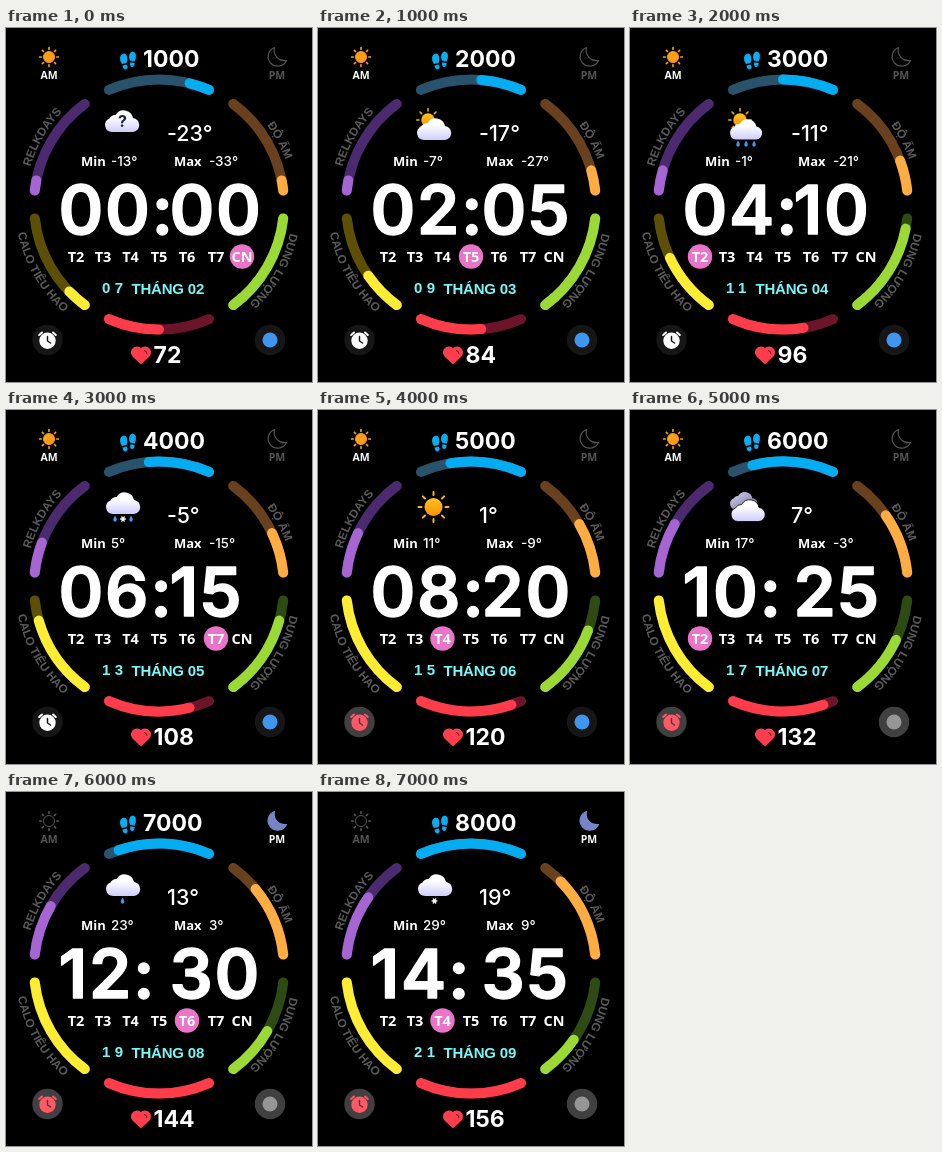
Write an HTML page that moves like this. It is 306 px wide and 354 px high and loops after 8 s.

```html
<!DOCTYPE html>
<html lang="vi">
<head>
<meta charset="utf-8">
<title>Watch face</title>
<style>
  html, body { margin: 0; width: 100%; height: 100%; overflow: hidden; background: #000; }
  svg { display: block; width: 306px; height: 354px; fill: #fff; font-family: Inter, sans-serif; font-feature-settings: "calt" 0; }
  .arc { fill: none; stroke-width: 10; stroke-linecap: round; }
  .label { font: bold 11.8px "Liberation Sans", Arial, sans-serif; fill: #5a5a5a; text-anchor: middle; }
  .time { font-size: 68px; font-weight: 600; letter-spacing: 1.7px; stroke: #fff; stroke-width: 1.4; stroke-linejoin: round; }
  .count { font-size: 23px; font-weight: 700; }
  .temp { font-size: 21.5px; font-weight: 500; }
  .range { font: 600 13px "Noto Sans", sans-serif; }
  .range .value { font: 500 13.5px Inter, sans-serif; }
  .day { font: 600 14.5px "Noto Sans", sans-serif; text-anchor: middle; }
  .date { font: bold 15px "Liberation Sans", Arial, sans-serif; fill: #76f7f8; }
  .half { font: bold 10.5px "Noto Sans", sans-serif; text-anchor: middle; }
  .line { fill: none; stroke-linecap: round; stroke-linejoin: round; }
</style>
</head>
<body>
<svg viewBox="0 0 306 354">
  <defs>
    <linearGradient id="mist" x1="0" y1="0" x2="0" y2="1">
      <stop offset=".3" stop-color="#fff"/><stop offset="1" stop-color="#cfcdfb"/>
    </linearGradient>
    <linearGradient id="dusk" x1="0" y1="0" x2="1" y2="1">
      <stop offset="0" stop-color="#d4d4ee"/><stop offset="1" stop-color="#6f6f9c"/>
    </linearGradient>
    <linearGradient id="gold" x1="0" y1="0" x2="0" y2="1">
      <stop offset="0" stop-color="#ffc226"/><stop offset="1" stop-color="#ff9200"/>
    </linearGradient>
    <path id="cloud" d="M7 23A7 7 0 0 1 4.500 9.500A6.500 6.500 0 0 1 10.500 6A9.500 9.500 0 0 1 28 9A7.050 7.050 0 0 1 28 23Z"/>
    <g id="sun">
      <circle r="9" fill="url(#gold)"/>
      <path class="line rays" stroke="#ffb21c" stroke-width="2"/>
    </g>
    <path id="drop" d="M0-3.500Q2.400 0 1.600 1.600A1.700 1.700 0 0 1-1.600 1.600Q-2 0 0-3.500Z" fill="#399df5"/>
    <path id="flake" class="line" d="M-2.400 0H2.400M-1.200-2.100L1.200 2.100M1.200-2.100L-1.200 2.100" stroke="#fff" stroke-width="1.300"/>
  </defs>
  <rect width="306" height="354" fill="#000"/>
  <g id="arcs"></g>
  <g id="labels"></g>

  <g id="am">
    <circle cx="43" cy="29" r="5.500"/>
    <path id="amRays" class="line" stroke-width="1.700" transform="translate(43 29)"/>
    <text class="half" x="43" y="51">AM</text>
  </g>
  <g id="pm">
    <path d="M268.500 19.500A9.600 9.600 0 1 0 280.500 32.500A10.500 10.500 0 0 1 268.500 19.500Z" stroke-width="1.200" stroke-linejoin="round"/>
    <text class="half" x="271" y="51">PM</text>
  </g>

  <g fill="#08aef2">
    <path d="M115 27Q119 23.500 121 28Q122 32 120.500 35L116 36Q112.500 31 115 27ZM116.500 37.500L121 36.500Q122.500 41 119.500 41.500Q117 41.500 116.500 37.500Z"/>
    <path d="M124 25Q127.500 21.500 129.800 26Q130.500 30 128.700 33.500L124.300 32.800Q122 29 124 25ZM124.300 34.300L128.600 35Q128.500 39.500 125.700 39Q123.500 38.500 124.300 34.300Z"/>
  </g>
  <text id="steps" class="count" x="137" y="39"></text>

  <g id="weather">
    <g>
      <use href="#cloud" x="99" y="81" fill="url(#mist)"/>
      <text x="116.500" y="99" text-anchor="middle" font-size="16" font-weight="700" fill="#20243a">?</text>
    </g>
    <g>
      <use href="#sun" transform="translate(110 92) scale(.75)"/>
      <use href="#cloud" x="99" y="89" fill="url(#mist)"/>
    </g>
    <g>
      <use href="#sun" transform="translate(110 92) scale(.75)"/>
      <use href="#cloud" transform="translate(100 90) scale(.94)" fill="url(#mist)"/>
      <use href="#drop" x="108" y="116"/><use href="#drop" x="116" y="116"/><use href="#drop" x="124" y="116"/>
    </g>
    <g>
      <use href="#cloud" x="100" y="81" fill="url(#mist)"/>
      <use href="#drop" x="109" y="109"/><use href="#flake" x="117" y="109"/><use href="#drop" x="125" y="109"/>
    </g>
    <g><use href="#sun" x="115.500" y="97"/></g>
    <g>
      <use href="#cloud" transform="translate(100 81) scale(.8)" fill="url(#dusk)"/>
      <use href="#cloud" x="101" y="88.500" fill="url(#mist)" stroke="#000" stroke-width=".8"/>
    </g>
    <g>
      <use href="#cloud" x="100" y="81" fill="url(#mist)"/>
      <use href="#drop" x="116.500" y="109"/>
    </g>
    <g>
      <use href="#cloud" x="100" y="81" fill="url(#mist)"/>
      <use href="#flake" x="116.500" y="109"/>
    </g>
  </g>

  <text id="temp" class="temp" x="161" y="112.500"></text>
  <g class="range">
    <text x="75" y="138">Min</text><text id="min" class="value" x="105" y="138"></text>
    <text x="168" y="138">Max</text><text id="max" class="value" x="203" y="138"></text>
  </g>

  <text id="hours" class="time" x="52.500" y="206"></text>
  <text id="minutes" class="time" x="163.500" y="206"></text>

  <circle id="today" cy="228.500" r="12.200" fill="#ea74ca"/>
  <g id="days"></g>

  <g class="date">
    <text id="date" x="96" y="265" letter-spacing="4.500"></text>
    <text id="month" x="125.500" y="266" letter-spacing="-.2"></text>
  </g>

  <g transform="translate(41.500 312)">
    <circle id="alarmBack" r="15.200"/>
    <g id="alarm">
      <circle cy=".7" r="8.200"/>
      <path class="line" d="M-8.300-5L-5.500-7.500M8.300-5L5.500-7.500" stroke="currentColor" stroke-width="2"/>
      <path id="hands" class="line" d="M0-3.500V1L3 3" stroke-width="1.500"/>
    </g>
  </g>
  <g transform="translate(264 312)">
    <circle id="linkBack" r="15.200"/>
    <circle id="link" r="7.500"/>
  </g>

  <path d="M135 335.500L127 328A5.300 5.300 0 0 1 135 321A5.300 5.300 0 0 1 143 328Z" fill="#ff3d4c" stroke="#ff3d4c" stroke-width="1.500" stroke-linejoin="round"/>
  <path class="line" d="M138.500 322.500Q141 323 141 325.500" stroke="#5c1219"/>
  <text id="pulse" class="count" x="147.500" y="335"></text>
</svg>
<script>
const STEP = 1000, COUNT = 8;
const $ = id => document.getElementById(id);
const pad = n => String(n).padStart(2, '0');
const paint = (node, attrs) => { for (const k in attrs) node.setAttribute(k, attrs[k]); };
const text = (id, value) => { $(id).textContent = value; };

function add(parent, tag, attrs, content = '') {
  const node = document.createElementNS('http://www.w3.org/2000/svg', tag);
  paint(node, attrs);
  node.textContent = content;
  parent.append(node);
  return node;
}

// Angles in degrees, clockwise from the top of the dial.
function point(r, deg) {
  const a = deg * Math.PI / 180;
  return (153 + r * Math.sin(a)).toFixed(2) + ' ' + (176.5 - r * Math.cos(a)).toFixed(2);
}
const arcPath = (r, from, to) =>
  `M${point(r, from)}A${r} ${r} 0 0 ${to > from ? 1 : 0} ${point(r, to)}`;

// Each gauge: middle angle, half sweep, track, fill, level in tenths for step i.
const SWEEP = 23.6;
const gauges = [
  [0, -SWEEP, '#29536d', '#04adf2', i => Math.ceil(i * 8 / 7 + 2)],
  [60, -SWEEP, '#6a411e', '#ffad43', i => i + 1],
  [120, -SWEEP, '#2d4b12', '#9bd936', i => Math.min(10, 11 - i)],
  [180, -SWEEP, '#6c152a', '#ff3c49', i => Math.min(10, Math.floor((72 + 12 * i) / 15) + 1)],
  [240, SWEEP, '#5d5006', '#ffec34', i => Math.min(10, 2 * i + 2)],
  [300, SWEEP, '#4c2a70', '#a565d3', i => Math.floor(.8 * i) + 1]
].map(([mid, half, track, color, level]) => {
  const from = mid - half === mid + SWEEP ? mid + SWEEP : mid - SWEEP;
  add($('arcs'), 'path', { class: 'arc', d: arcPath(125, from, from + 2 * half), stroke: track });
  const fill = add($('arcs'), 'path', { class: 'arc', stroke: color });
  return i => fill.setAttribute('d', arcPath(125, from, from + half * level(i) / 5));
});

[
  ['RELKDAYS', 134, 270, 330],
  ['ĐỘ ẨM', 134, 32, 92],
  ['DUNG LƯỢNG', 134, 90, 150],
  ['CALO TIÊU HAO', 144, 270, 210]
].forEach(([label, r, from, to], n) => {
  add($('labels'), 'path', { id: 'curve' + n, d: arcPath(r, from, to), fill: 'none' });
  const node = add($('labels'), 'text', { class: 'label' });
  add(node, 'textPath', { href: '#curve' + n, startOffset: '50%' }, label);
});

function rays(inner, outer) {
  let d = '';
  for (let k = 0; k < 8; k++) {
    const x = Math.cos(k * Math.PI / 4), y = Math.sin(k * Math.PI / 4);
    d += `M${x * inner} ${y * inner}L${x * outer} ${y * outer}`;
  }
  return d;
}
document.querySelector('.rays').setAttribute('d', rays(12, 15));
$('amRays').setAttribute('d', rays(7.8, 9.3));

const dayX = [70, 97, 124.5, 153, 181, 210, 236];
['T2', 'T3', 'T4', 'T5', 'T6', 'T7', 'CN'].forEach((name, n) =>
  add($('days'), 'text', { class: 'day', x: dayX[n], y: 233.5 }, name));

function showHalf(pm) {
  const [sun, sunRays, am] = $('am').children;
  const [moon, label] = $('pm').children;
  const dim = '#555';
  paint(sun, { fill: pm ? 'none' : '#ff9d16', stroke: pm ? dim : '#ff9d16' });
  paint(sunRays, { stroke: pm ? dim : '#ff9d16' });
  paint(am, { fill: pm ? dim : '#fff' });
  paint(moon, { fill: pm ? '#7685c6' : 'none', stroke: pm ? '#7685c6' : dim });
  paint(label, { fill: pm ? '#fff' : dim });
}

function showButtons(alarmOn, linked) {
  const back = lit => lit ? '#404040' : '#161616';
  const color = alarmOn ? '#ff5966' : '#fff';
  paint($('alarmBack'), { fill: back(alarmOn) });
  paint($('alarm'), { fill: color, color });
  paint($('hands'), { stroke: back(alarmOn) });
  paint($('linkBack'), { fill: back(!linked) });
  paint($('link'), { fill: linked ? '#3f96ee' : '#969696' });
}

function show(i) {
  gauges.forEach(set => set(i));
  text('steps', 1000 * (i + 1));
  text('pulse', 72 + 12 * i);
  text('temp', 6 * i - 23 + '°');
  text('min', 6 * i - 13 + '°');
  text('max', 6 * i - 33 + '°');
  text('hours', pad(2 * i) + ':');
  text('minutes', pad(5 * i));
  text('date', pad(7 + 2 * i));
  text('month', 'THÁNG ' + pad(2 + i));
  $('today').setAttribute('cx', dayX[(6 + Math.floor(i * 31 / 7)) % 7]);
  [...$('weather').children].forEach((icon, n) => { icon.style.display = n === i ? '' : 'none'; });
  showHalf(i >= 6);
  showButtons(i >= 4, i < 5);
}

const start = performance.now();
let shown = -1;
function tick() {
  const i = Math.floor((performance.now() - start) / STEP) % COUNT;
  if (i !== shown) show(shown = i);
  requestAnimationFrame(tick);
}
tick();
</script>
</body>
</html>
```
